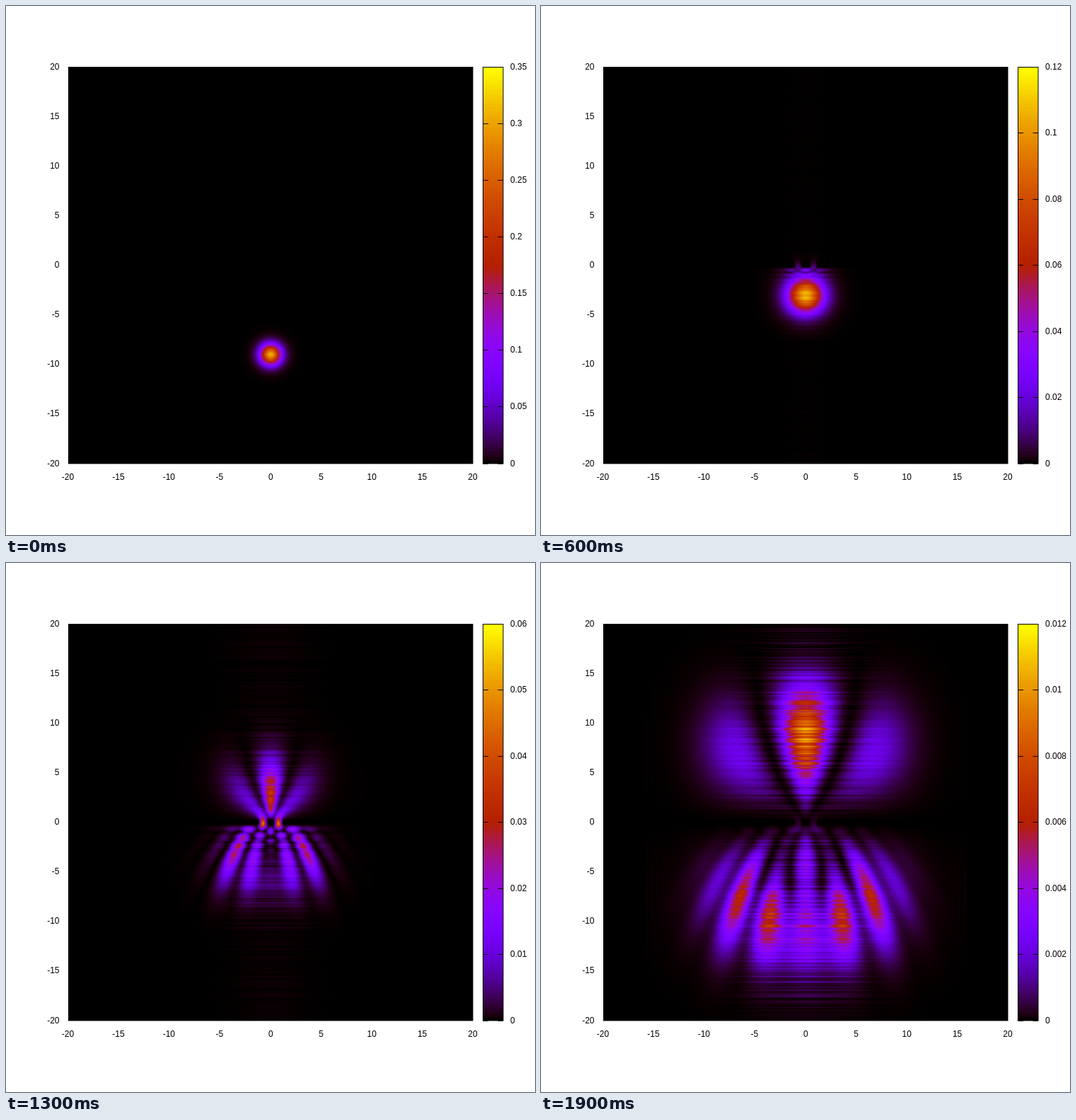
These frames come from a looping animation (748 px wide and 748 px high, 2000 ms). An HTML page with a canvas:

```html
<!DOCTYPE html>
<html lang="en">
<head>
<meta charset="utf-8">
<title>Wave packet at a double slit</title>
<style>
  html, body { margin: 0; width: 100%; height: 100%; overflow: hidden; background: #fff; }
  canvas { display: block; }
</style>
</head>
<body>
<canvas id="stage" width="748" height="748"></canvas>
<script>
const ctx = document.getElementById('stage').getContext('2d');
const FRAMES = 20, FRAME_MS = 100, FRAME_TIME = 0.2;
const PLOT = { x: 88.5, y: 86.5, w: 571.5, h: 560.5 };
const BAR = { x: 674.5, y: 86.5, w: 28.5, h: 560.5 };

// Half of the plane (x >= 0, mirrored), with two ghost cells on each side.
const DX = 0.1, NX = 160, NY = 401, W = NX + 4, SIZE = W * (NY + 4);
const SUBSTEPS = 60, DT = FRAME_TIME / SUBSTEPS;
const K = 5, START_Y = -10;
const SLIT_IN = 0.35, SLIT_OUT = 1.15, WALL_HALF = 0.25;
const FREE_FRAMES = 5;

const re = new Float64Array(SIZE), im = new Float64Array(SIZE), open = new Float64Array(SIZE);
const xAt = i => i * DX, yAt = j => -20 + j * DX;
const at = (i, j) => (j + 2) * W + i + 2;

function eachNode(visit) {
  for (let j = 0; j < NY; j++)
    for (let i = 0; i < NX; i++) visit(at(i, j), xAt(i), yAt(j));
}

eachNode((n, x, y) => {
  const inSlit = x > SLIT_IN && x < SLIT_OUT;
  open[n] = Math.abs(y) > WALL_HALF || inSlit ? 1 : 0;
});

// Freely spreading Gaussian packet; part is Math.cos or Math.sin.
function fillPacket(field, t, part) {
  const spread = 1 + t * t, peak = Math.sqrt(1 / (Math.PI * spread));
  eachNode((n, x, y) => {
    const dy = y - START_Y - K * t, r2 = x * x + dy * dy;
    const phase = r2 * t / (2 * spread) + K * (y - START_Y) - K * K * t / 2 - Math.atan(t);
    field[n] = open[n] * peak * Math.exp(-r2 / (2 * spread)) * part(phase);
  });
  mirror(field);
}

function mirror(field) {
  for (let n = 0; n < SIZE; n += W) {
    field[n] = field[n + 4];
    field[n + 1] = field[n + 3];
  }
}

// target += amount * laplacian(source), fourth order
function addLaplacian(target, source, amount) {
  const a = amount * 4 / 3 / (DX * DX), b = -a / 16, c = -a * 3.75;
  for (let j = 0; j < NY; j++) {
    for (let n = at(0, j), end = n + NX; n < end; n++) {
      target[n] += open[n] * (c * source[n]
        + a * (source[n - 1] + source[n + 1] + source[n - W] + source[n + W])
        + b * (source[n - 2] + source[n + 2] + source[n - 2 * W] + source[n + 2 * W]));
    }
  }
  mirror(target);
}

function advance(frame) {
  const t = (frame + 1) * FRAME_TIME;
  if (frame < FREE_FRAMES) {
    fillPacket(re, t, Math.cos);
    fillPacket(im, t + DT / 2, Math.sin);
    return;
  }
  for (let s = 0; s < SUBSTEPS; s++) {
    addLaplacian(re, im, -DT / 2);
    addLaplacian(im, re, DT / 2);
  }
}

const clamp01 = v => Math.min(1, Math.max(0, v));

function palette(v) {
  v = clamp01(v);
  return [Math.sqrt(v), v ** 3, Math.max(0, Math.sin(2 * Math.PI * v))].map(c => Math.round(255 * c));
}

function random(seed) {
  const s = Math.sin(seed * 12.9898) * 43758.5453;
  return s - Math.floor(s);
}

function tickStep(range) {
  const unit = 10 ** Math.floor(Math.log10(range)), norm = range / unit;
  return unit * (norm < 2 ? 0.2 : norm < 5 ? 0.5 : 1);
}

function renderFrame(frame) {
  advance(frame);
  const t = (frame + 1) * FRAME_TIME;
  const density = new Float64Array(SIZE);
  let peak = 0;
  eachNode(n => {
    density[n] = re[n] * re[n] + im[n] * im[n];
    peak = Math.max(peak, density[n]);
  });

  const ripple = 0.045 / t * clamp01((t - 1.2) / 0.8);
  const loudest = (Math.sqrt(peak) + ripple) ** 2;
  const step = tickStep(loudest), max = step * Math.ceil(loudest / step - 1e-6);

  const cells = NY - 1, half = cells / 2;
  const image = new ImageData(cells, cells);
  for (let row = 0; row < cells; row++) {
    const j = cells - 1 - row;
    const wobble = ripple * (2 * random(row + frame * 411) - 1);
    for (let i = 0; i < half; i++) {
      let rgb = [0, 0, 0];
      if (i < NX - 1) {
        const n = at(i, j), x = xAt(i + 0.5);
        const d = (density[n] + density[n + 1] + density[n + W] + density[n + W + 1]) / 4;
        const noise = wobble * Math.exp(-x * x / (2.2 * t * t));
        const nearWall = clamp01(Math.abs(yAt(j)) / 2);
        rgb = palette((Math.sqrt(d) + noise * nearWall) ** 2 / max);
      }
      for (const col of [half + i, half - 1 - i])
        image.data.set([...rgb, 255], 4 * (row * cells + col));
    }
  }
  const picture = new OffscreenCanvas(cells, cells);
  picture.getContext('2d').putImageData(image, 0, 0);
  return { picture, max, step };
}

const cache = [];
function getFrame(index) {
  while (cache.length <= index) cache.push(renderFrame(cache.length));
  return cache[index];
}

function label(text, x, y, align) {
  ctx.textAlign = align;
  ctx.fillText(text, x, y);
}

function line(x1, x2, y) {
  ctx.beginPath();
  ctx.moveTo(x1, y);
  ctx.lineTo(x2, y);
  ctx.stroke();
}

function drawBar(max, step) {
  const bands = 128, right = BAR.x + BAR.w, bottom = BAR.y + BAR.h;
  for (let b = 0; b < bands; b++) {
    const top = Math.round(bottom - (b + 1) * BAR.h / bands);
    ctx.fillStyle = `rgb(${palette(b / (bands - 1))})`;
    ctx.fillRect(BAR.x, top, BAR.w, Math.round(bottom - b * BAR.h / bands) - top);
  }
  ctx.strokeRect(BAR.x, BAR.y, BAR.w, BAR.h);
  ctx.fillStyle = '#000';
  for (let k = 0; k <= Math.round(max / step); k++) {
    const y = Math.floor(bottom - k * step / max * BAR.h) + 0.5;
    line(BAR.x, BAR.x + 7.5, y);
    line(right - 7.5, right, y);
    label(String(+(k * step).toPrecision(4)), 713, y + 3.5, 'left');
  }
}

function draw(index) {
  const { picture, max, step } = getFrame(index);
  ctx.fillStyle = '#fff';
  ctx.fillRect(0, 0, 748, 748);
  ctx.drawImage(picture, PLOT.x, PLOT.y, PLOT.w, PLOT.h);
  ctx.strokeStyle = '#000';
  ctx.lineWidth = 1;
  ctx.strokeRect(PLOT.x, PLOT.y, PLOT.w, PLOT.h);
  ctx.fillStyle = '#000';
  ctx.font = '12px "Liberation Sans", Arial, sans-serif';
  for (let v = -20; v <= 20; v += 5) {
    label(v, PLOT.x + (v + 20) / 40 * PLOT.w - (v < 0 ? 1 : 0), 670, 'center');
    label(v, 75.5, PLOT.y + (20 - v) / 40 * PLOT.h + 3.5, 'right');
  }
  drawBar(max, step);
}

let shown = -1;
function tick() {
  const index = Math.floor(performance.now() / FRAME_MS) % FRAMES;
  if (index !== shown) draw(shown = index);
  else if (cache.length < FRAMES) getFrame(cache.length);
  requestAnimationFrame(tick);
}
tick();
</script>
</body>
</html>
```
